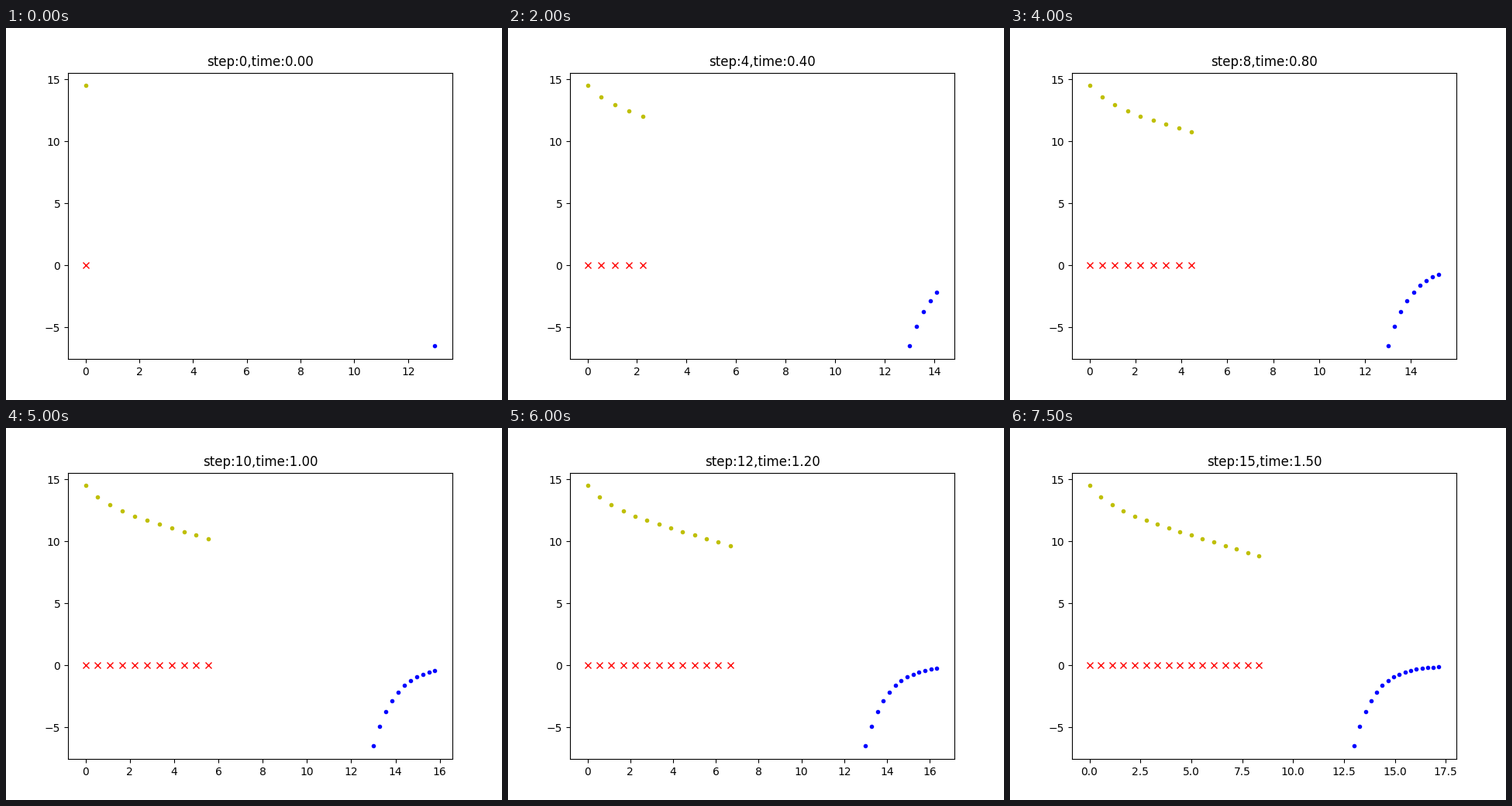
A matplotlib script that plays this animation: 640x480 px, repeating every 8 s.

```python
import matplotlib.pyplot as plt
import numpy as np
from matplotlib.animation import FuncAnimation

STEPS = 16
DT = 0.1
V_LEAD = 10 / 3.6      # m/s
V_FOLLOW = 20 / 3.6    # m/s
START_GAP = 13.0

fig, ax = plt.subplots(figsize=(6.4, 4.8), dpi=100)
follower, = ax.plot([], [], "rx")
leader, = ax.plot([], [], "b.")
spacing, = ax.plot([], [], "y.")


def update(step):
    t = DT * np.arange(step + 1)
    x_follow = V_FOLLOW * t
    x_lead = START_GAP + V_LEAD * t
    gap = x_lead - x_follow

    follower.set_data(x_follow, np.zeros_like(t))
    leader.set_data(x_lead, -6.5 * np.exp(-V_LEAD * t))
    spacing.set_data(x_follow, gap + 1.5 * np.exp(-V_FOLLOW * t))

    ax.set_title(f"step:{step},time:{step * DT:.2f}")
    ax.relim()
    ax.autoscale_view()
    return follower, leader, spacing


anim = FuncAnimation(fig, update, frames=STEPS, interval=500,
                     repeat=True, repeat_delay=0, blit=False)
plt.show()
```
